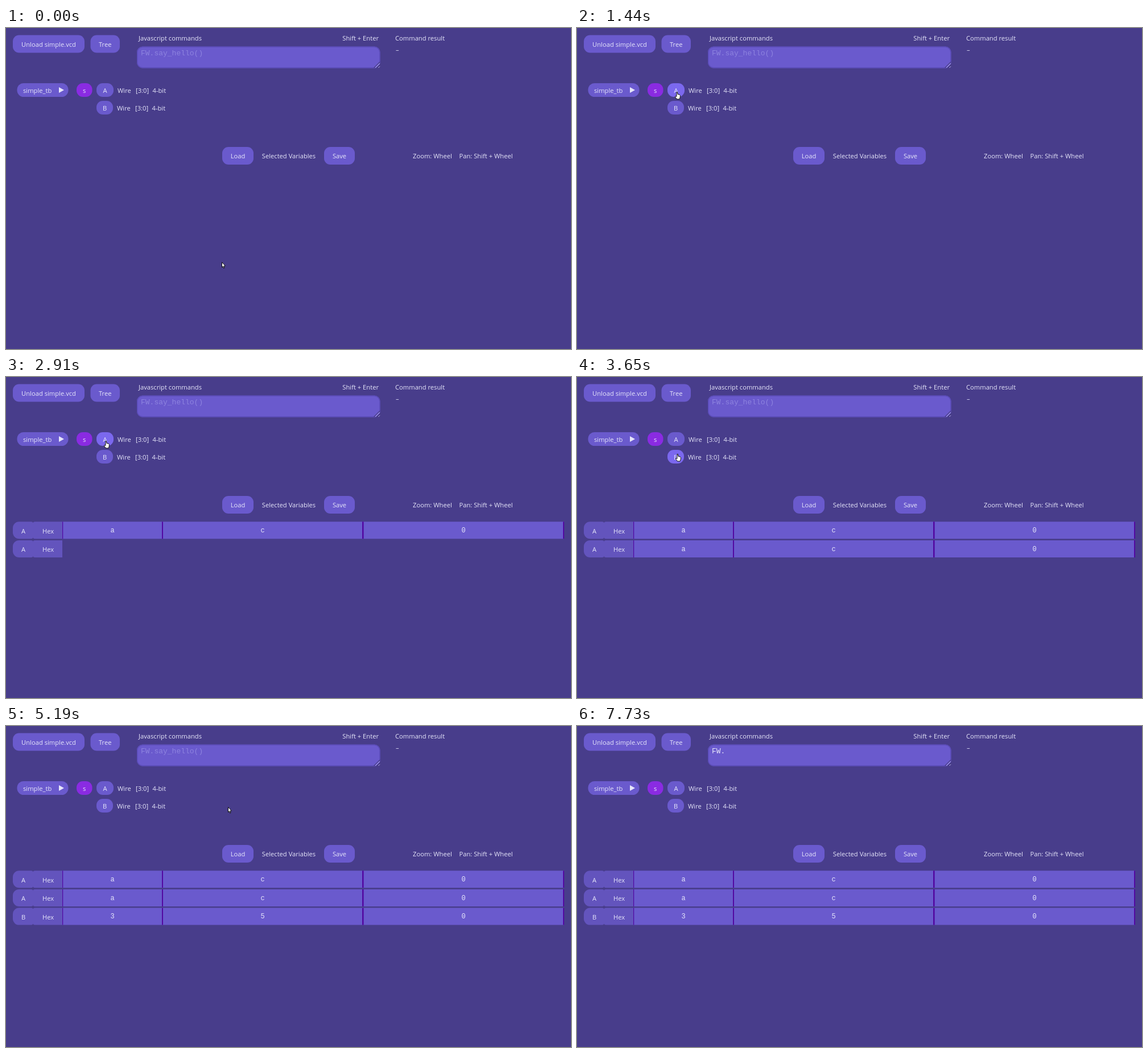
An HTML page with a canvas for the animation above (8000 ms loop, 993 px wide and 564 px high).

```html
<!DOCTYPE html>
<html lang="en">
<head>
<meta charset="utf-8">
<title>Waveform viewer</title>
<style>
  html, body { margin: 0; width: 100%; height: 100%; overflow: hidden; background: #483d8b; }
  canvas { display: block; width: 993px; height: 564px; }
</style>
</head>
<body>
<canvas id="stage" width="993" height="564"></canvas>
<script>
const ctx = document.getElementById('stage').getContext('2d');
const LOOP = 8000;
const SANS = '11.2px "Open Sans", "Noto Sans", sans-serif';
const MONO = '13px "Liberation Mono", "DejaVu Sans Mono", monospace';
const COLOR = {
  back: '#483d8b', button: '#6a5acd', hover: '#7b68ee', scope: '#8a2be2', label: '#6354bd',
  text: '#e6e6fa', hint: '#8d83df', edge: '#5b4cb8', divider: '#5208a0', click: 'rgba(255,255,0,.47)'
};
const CHIP_A = { x: 159, y: 97, w: 30, h: 24 };
const CHIP_B = { x: 159, y: 128, w: 29, h: 24 };
const AREA = { x: 230, y: 32.5, w: 427.5, h: 38 };

// Each row shows its label first and its wave one step later.
const ROWS = [
  { name: 'A', values: 'ac0', label: 2050, wave: 2120 },
  { name: 'A', values: 'ac0', label: 2910, wave: 2980 },
  { name: 'B', values: '350', label: 4390, wave: 4450 }
];
const CLICKS = [[1970, 2050], [2840, 2910], [4320, 4390], [6070, 6140]];

const smooth = f => f * f * (3 - 2 * f);
const easeOut = f => 1 - (1 - f) * (1 - f);
const linear = f => f;

// Pointer moves: time of first and last step, step count, easing, points [progress, x, y].
const MOVES = [
  { from: 110, to: 890, steps: 12, ease: smooth, path: [[0, 379, 411], [1, 219, 146]] },
  { from: 960, to: 1440, steps: 8, ease: easeOut, path: [[0, 219, 146], [1, 176, 112]] },
  { from: 3240, to: 3650, steps: 6, ease: smooth, path: [[0, 176, 112], [1, 177, 135]] },
  { from: 4980, to: 5730, steps: 12, ease: linear, path: [
    [0, 177, 135], [1 / 12, 194, 147], [2 / 12, 255, 154], [3 / 12, 336, 152],
    [4 / 12, 390, 142], [6 / 12, 404, 125], [9 / 12, 404, 92], [1, 401, 63.5]] },
  { from: 5800, to: 5870, steps: 2, ease: linear, path: [[0, 401, 63.5], [1, 401, 56.5]] }
];

function alongPath(path, f) {
  let i = 1;
  while (i < path.length - 1 && f > path[i][0]) i++;
  const [fa, xa, ya] = path[i - 1], [fb, xb, yb] = path[i];
  const k = (f - fa) / (fb - fa);
  return { x: xa + (xb - xa) * k, y: ya + (yb - ya) * k };
}

function pointerAt(t) {
  const move = MOVES.filter(m => t >= m.from).pop();
  if (!move) return { x: 379, y: 411 };
  const gap = (move.to - move.from) / (move.steps - 1);
  const step = Math.min(move.steps, Math.floor((t - move.from) / gap + 1e-6) + 1);
  return alongPath(move.path, move.ease(step / move.steps));
}

const inside = (p, r) => p.x >= r.x && p.x < r.x + r.w && p.y >= r.y && p.y < r.y + r.h;

function box(x, y, w, h, radius, color) {
  ctx.fillStyle = color;
  ctx.beginPath();
  ctx.roundRect(x, y, w, h, radius);
  ctx.fill();
}

function text(str, x, y, align = 'left', font = SANS, color = COLOR.text) {
  ctx.font = font;
  ctx.textAlign = align;
  ctx.fillStyle = color;
  ctx.fillText(str, x, y);
}

function button(str, x, y, w, h, color = COLOR.button) {
  box(x, y, w, h, 11, color);
  text(str, x + w / 2, y + h / 2 + 4.8, 'center');
}

function shape(points, x, y) {
  ctx.beginPath();
  points.forEach(([dx, dy]) => ctx.lineTo(x + dx, y + dy));
  ctx.closePath();
}

function drawHeader() {
  button('Unload simple.vcd', 12, 12.5, 126, 31);
  button('Tree', 148.5, 12.5, 51.5, 31);
  text('Javascript commands', 233, 22);
  text('Shift + Enter', 655, 22, 'right');
  text('Command result', 684, 22);
  text('–', 685, 41.5);
  button('Load', 380, 209, 55, 31);
  text('Selected Variables', 497, 229, 'center');
  button('Save', 559, 209, 54, 31);
  text('Zoom: Wheel', 715, 229);
  text('Pan: Shift + Wheel', 796.5, 229);
}

function drawTree(pointer) {
  box(19.5, 97, 90, 24, 11.5, COLOR.button);
  text('simple_tb', 30, 114);
  ctx.fillStyle = COLOR.text;
  shape([[0, 0], [9, 5], [0, 10]], 93, 104);
  ctx.fill();
  button('s', 124, 97, 27.5, 24, COLOR.scope);
  [[CHIP_A, 'A', 196], [CHIP_B, 'B', 195]].forEach(([c, name, x]) => {
    button(name, c.x, c.y, c.w, c.h, inside(pointer, c) ? COLOR.hover : COLOR.button);
    text('Wire', x, c.y + 17);
    text('[3:0]', x + 32, c.y + 17);
    text('4-bit', x + 61.5, c.y + 17);
  });
}

function drawCommand(t) {
  const typed = t < 6870 ? '' : t < 7070 ? 'F' : t < 7600 ? 'FW' : 'FW.';
  box(AREA.x, AREA.y, AREA.w, AREA.h, 10, COLOR.button);
  ctx.strokeStyle = COLOR.edge;
  ctx.lineWidth = 1.4;
  ctx.beginPath();
  ctx.roundRect(AREA.x + .7, AREA.y + .7, AREA.w - 1.4, AREA.h - 1.4, 9.5);
  ctx.stroke();

  // resize grip
  ctx.lineWidth = 1;
  for (let i = 0; i < 4; i++) {
    ctx.strokeStyle = i % 2 ? '#b9b0ea' : '#35305f';
    ctx.beginPath();
    ctx.moveTo(646.5 + i * 2.6, 70);
    ctx.lineTo(657, 59.5 + i * 2.6);
    ctx.stroke();
  }

  text(typed || 'FW.say_hello()', 237, 48, 'left', MONO, typed ? COLOR.text : COLOR.hint);
  const caretOn = [[6140, 6670], [6870, 7200], [7600, 7730]].some(([a, b]) => t >= a && t < b);
  if (caretOn) box(236 + typed.length * 7.8, 38, 1.2, 14, 0, COLOR.text);
}

function drawRow(row, y, t) {
  if (t < row.label) return;
  box(12, y, 36, 30, [11, 4, 4, 11], COLOR.label);
  box(47, y, 52, 30, [4, 0, 0, 4], COLOR.label);
  text(row.name, 30.5, y + 20.5, 'center');
  text('Hex', 74, y + 20.5, 'center');
  if (t < row.wave) return;
  box(99, y, 882, 30, 0, COLOR.button);
  [[99, 1.2], [274, 2], [626, 2.6], [979, 2]].forEach(([x, w]) => box(x, y, w, 30, 0, COLOR.divider));
  [187, 451, 804].forEach((x, i) => text(row.values[i], x, y + 18.7, 'center', MONO.replace('13', '12')));
}

function outlined(points, x, y) {
  shape(points, x, y);
  ctx.fillStyle = '#fff';
  ctx.strokeStyle = '#111';
  ctx.lineWidth = 1;
  ctx.lineJoin = 'round';
  ctx.fill();
  ctx.stroke();
}

function drawPointer(p, t) {
  if (CLICKS.some(([a, b]) => t >= a && t < b)) {
    ctx.fillStyle = COLOR.click;
    ctx.beginPath();
    ctx.arc(p.x, p.y, 8, 0, Math.PI * 2);
    ctx.fill();
  }
  if (t >= 6870) return;
  if (inside(p, AREA)) {
    const beam = '#95a532';
    box(p.x - .5, p.y - 5, 1, 10, 0, beam);
    [-5.5, 4.5].forEach(dy => {
      box(p.x - 2.5, p.y + dy, 2, 1, 0, beam);
      box(p.x + .5, p.y + dy, 2, 1, 0, beam);
    });
  } else if (inside(p, CHIP_A) || inside(p, CHIP_B)) {
    outlined([[-1, .5], [.5, .5], [1, 4.5], [4, 5], [5.5, 6.5], [5, 10.5], [4, 13],
      [-.5, 13], [-3.5, 9], [-3, 7.5], [-1, 8.5]], p.x, p.y);
  } else {
    outlined([[.5, .5], [.5, 9.5], [2.3, 7.8], [3.7, 11], [5, 10.4], [3.7, 7.3], [6.3, 7]], p.x, p.y);
  }
}

function draw() {
  const t = performance.now() % LOOP;
  const pointer = pointerAt(t);
  box(0, 0, 993, 564, 0, COLOR.back);
  drawHeader();
  drawTree(pointer);
  drawCommand(t);
  ROWS.forEach((row, i) => drawRow(row, 254.2 + i * 32.7, t));
  drawPointer(pointer, t);
  requestAnimationFrame(draw);
}
draw();
</script>
</body>
</html>
```
